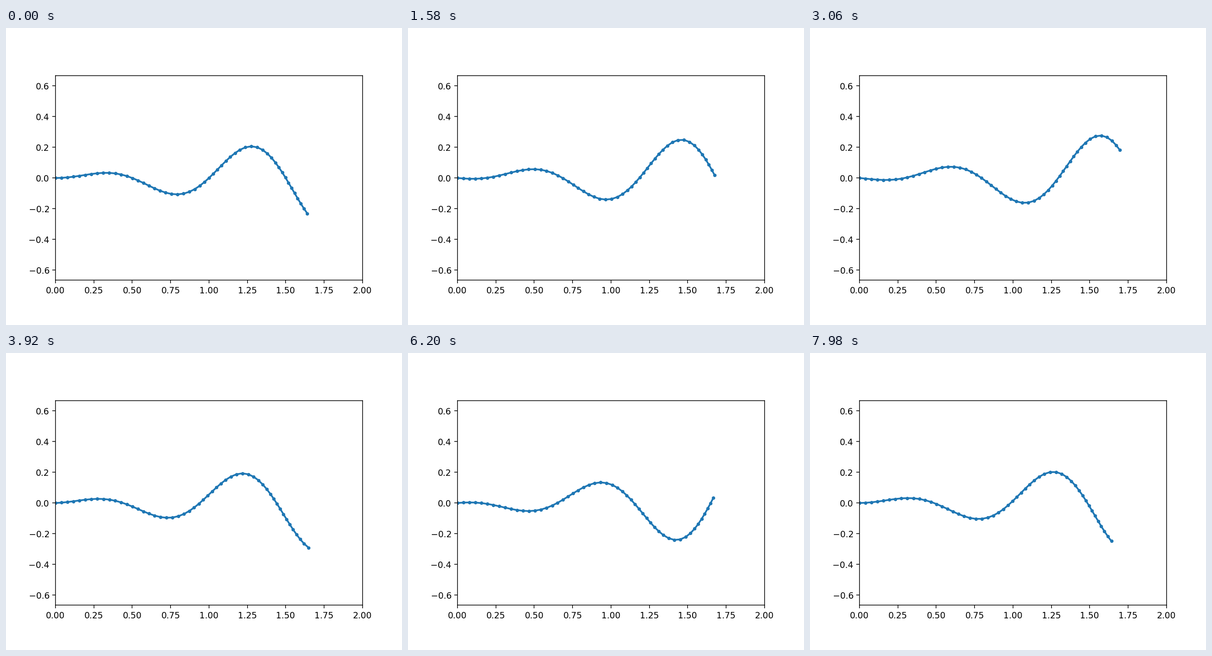
A matplotlib script that plays this animation: 864x648 px, repeating every 8 s.

```python
import numpy as np
import matplotlib.pyplot as plt
from matplotlib.animation import FuncAnimation

FRAMES, INTERVAL = 400, 20      # 8 s loop
LENGTH, LINKS = 2.0, 51         # body length and number of equal links
FREQ, WAVELENGTH = 0.75, 1.0    # travelling wave
C1, C2 = 0.1, 0.05              # amplitude envelope C1*x + C2*x^2

grid = np.linspace(0, LENGTH, 4001)
joints = np.linspace(0, LENGTH, LINKS + 1)


def wave(x, t):
    return (C1 * x + C2 * x**2) * np.sin(2 * np.pi * (x / WAVELENGTH - FREQ * t))


def body(t):
    """Joint positions, evenly spaced along the arc of the wave."""
    steps = np.hypot(np.diff(grid), np.diff(wave(grid, t)))
    arc = np.concatenate(([0], np.cumsum(steps)))
    x = np.interp(joints, arc, grid)
    return x, wave(x, t)


fig, ax = plt.subplots(figsize=(6.4, 4.8), dpi=135)
ax.set_aspect("equal", adjustable="box")
ax.set_xlim(0, 2)
ax.set_ylim(-2 / 3, 2 / 3)
line, = ax.plot(*body(0), "o-", lw=2, ms=3, color="C0")


def update(frame):
    line.set_data(*body(frame * INTERVAL / 1000))
    return line,


anim = FuncAnimation(fig, update, frames=FRAMES, interval=INTERVAL,
                     init_func=lambda: update(0), repeat=True, repeat_delay=0)
plt.show()
```
